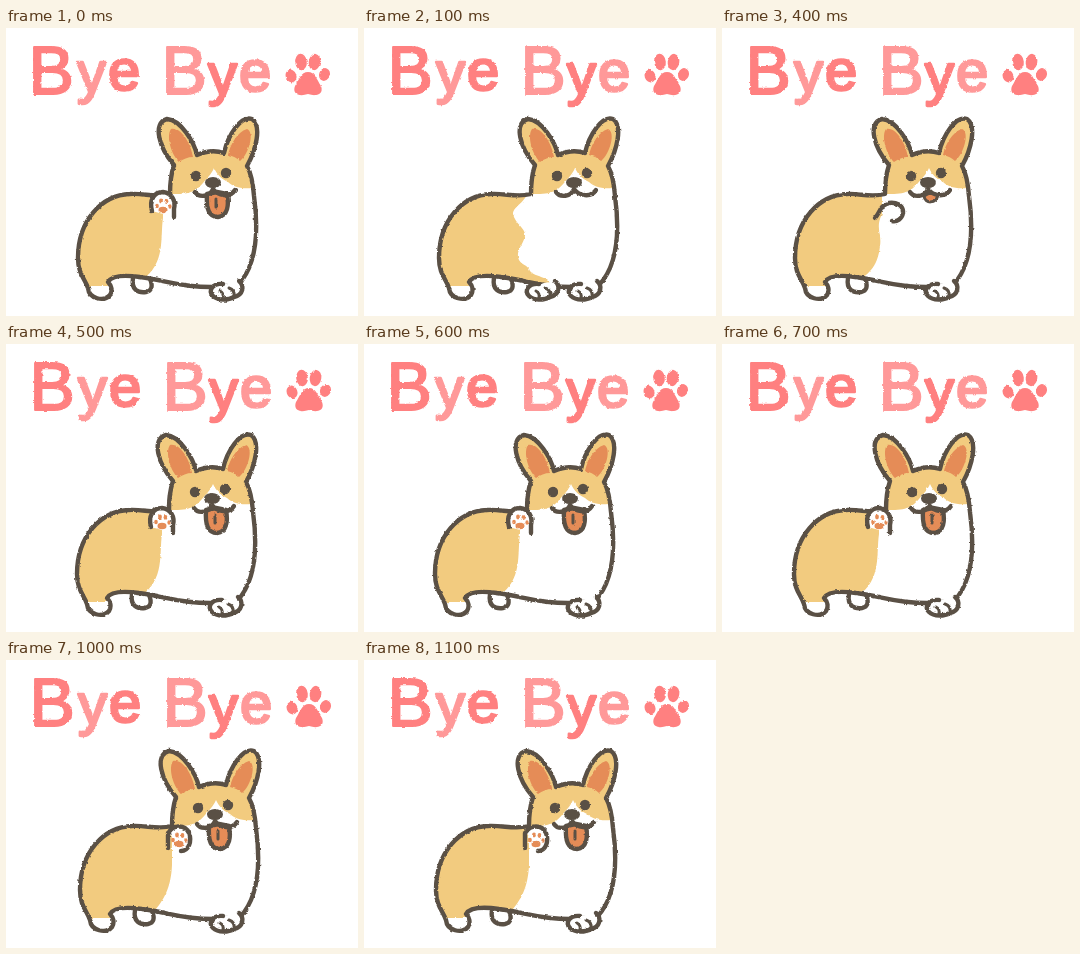
An HTML page for the animation above (1200 ms loop, 352 by 288 pixels).

```html
<!DOCTYPE html>
<html lang="en">
<head>
<meta charset="utf-8">
<title>Bye Bye</title>
<style>
html, body { margin: 0; width: 100%; height: 100%; overflow: hidden; background: #fff; }
svg { display: block; width: 352px; height: 288px; }
.line { fill: none; stroke: #5a5045; stroke-width: 4.4; stroke-linecap: round; stroke-linejoin: round; }
.white { fill: #fff; }
.tan { fill: #f2cb7f; }
.orange { fill: #e58c57; }
.dark { fill: #5a5045; }
.thin { stroke-width: 3; }
text { font: 58px "Liberation Sans", Arial, sans-serif; stroke-width: 2.6; stroke-linejoin: round; }
.cap { font-size: 68px; stroke-width: 2; }
.deep { fill: #ff8080; stroke: #ff8080; }
.pale { fill: #ff9999; stroke: #ff9999; }
.print { stroke: none; }
</style>
</head>
<body>
<svg viewBox="0 0 352 288">
  <defs>
    <filter id="crayon" filterUnits="userSpaceOnUse" x="0" y="0" width="352" height="288" color-interpolation-filters="sRGB">
      <feTurbulence id="noise" type="fractalNoise" baseFrequency=".3" numOctaves="2" result="n"/>
      <feDisplacementMap in="SourceGraphic" in2="n" scale="2.5" xChannelSelector="R" yChannelSelector="G"/>
    </filter>
    <clipPath id="inside"><path id="mask"/></clipPath>
  </defs>
  <g filter="url(#crayon)">
    <g id="title">
      <text><tspan class="deep cap" x="22.4" y="66">B</tspan><tspan class="pale" x="71" y="64">y</tspan><tspan class="deep" x="102" y="62">e</tspan>
        <tspan class="pale cap" x="155.4" y="66">B</tspan><tspan class="deep" x="202" y="66">y</tspan><tspan class="pale" x="233" y="63">e</tspan></text>
      <g class="deep print">
        <path d="M302 44C309 44 311 52 315 58C318 66 311 69 302 66C293 69 286 66 289 58C293 52 295 44 302 44Z"/>
        <ellipse cx="285" cy="48" rx="5.400" ry="6.500" transform="rotate(-20 285 48)"/>
        <ellipse cx="295" cy="34" rx="5.800" ry="8.200" transform="rotate(-6 295 34)"/>
        <ellipse cx="308.500" cy="34" rx="5.800" ry="8.200" transform="rotate(8 308.500 34)"/>
        <ellipse cx="318.500" cy="46.500" rx="5.400" ry="6.500" transform="rotate(20 318.500 46.500)"/>
      </g>
    </g>
    <g id="dog"></g>
  </g>
</svg>
<script>
const $ = id => document.getElementById(id);
const shape = (cls, d) => `<path class="${cls}" d="${d}"/>`;
const oval = (cls, x, y, rx, ry = rx) => `<ellipse class="${cls}" cx="${x}" cy="${y}" rx="${rx}" ry="${ry}"/>`;

// h shifts the rump sideways
const outline = h => `M164 166C150 170 138 165 ${124 + h} 166C${96 + h} 167 ${72 + h} 192 ${72 + h} 230
  C${72 + h} 246 ${79 + h} 251 ${82 + h} 260C${83 + h} 271 ${98 + h} 274 ${104 + h} 267
  C${107 + h} 262 ${105 + h} 257 ${102 + h} 254C${106 + h} 247 120 247 134 249C160 252 172 259 205 259
  L232 257C250 238 253 205 248 168C247 155 245 145 241 138C250 122 256 98 246 91
  C235 87 222 107 218 125C209 122 200 123 191 127C188 114 175 92 161 91
  C146 95 153 120 168 137C165 146 164 156 164 166Z`;

const coat = {
  stand: 'H163C158 176 146 178 146 186C148 196 159 200 158 208C156 217 150 221 151 229C153 238 161 236 163 243C169 250 180 247 183 257',
  step: 'H162C160 176 148 178 148 186C149 196 160 200 160 208C157 217 151 222 156 230C158 240 166 240 170 246L166 258',
  lift: 'H161V186C154 200 161 205 159 218C157 236 150 246 134 254',
  left: 'H157V190C154 210 160 235 136 252',
  right: 'H164V205C163 228 156 240 144 254'
};

const foot = dx => `<g transform="translate(${dx})">`
  + shape('line white', 'M217 256C206 255 202 263 207 268C212 273 223 272 228 269C237 267 239 258 233 253')
  + shape('line thin', 'M214 263Q218 265 217 270M223 260Q229 262 228 268') + '</g>';

const paw = (x, y, edge) => `<g transform="translate(${x} ${y})">` + shape('line white', edge)
  + oval('orange', 0, 5, 4.5, 3.3) + oval('orange', -6, 1, 1.8, 2.3) + oval('orange', -2, -4, 1.9, 2.4)
  + oval('orange', 3.5, -3.5, 1.9, 2.4) + oval('orange', 7, 1.5, 1.6, 2.2) + '</g>';

const limb = {
  stand: () => foot(-45) + foot(-3),
  step: () => foot(0) + shape('line white', 'M163 245C172 239 186 235 190 244C194 253 184 258 176 256C171 255 167 255 164 258'),
  lift: () => foot(0) + shape('line', 'M154 190C157 187 158 183 161 179C168 172 183 174 182 185C181 191 176 194 171 193'),
  left: () => foot(0) + paw(157, 177, 'M-11 6C-14 -5 -9 -13 0 -13C9 -12 13 -4 11 4L11 12'),
  right: () => foot(-2) + paw(171, 179, 'M-10 -7C-6 -14 6 -15 10 -6C13 2 10 12 2 12M-11 -6V9')
};

function face(pose) {
  const shut = pose === 'stand' || pose === 'step';
  let tongue = '';
  if (pose === 'lift') tongue = shape('line orange thin', 'M203 168C204 176 215 176 217 167Q210 163 203 168Z');
  else if (!shut) tongue = shape('line orange', 'M201 166C200 181 203 189 212 189C222 188 223 177 221 166L211 164Z')
    + shape('line thin', 'M210 171V179');
  return shape('orange', 'M165 101C160 108 165 126 173 134C177 131 182 129 187 129C185 117 176 99 165 101Z')
    + shape('orange', 'M241 101C231 104 224 117 222 127C227 128 231 130 234 133C243 126 249 104 241 101Z')
    + tongue
    + shape('line', 'M189 164C193 170 204 169 207 161C212 168 224 170 229 162')
    + oval('dark', 190, 148, 5.2) + oval('dark', 220, 145, 5.2) + oval('dark', 207, 154.5, 8, 5.5);
}

// pose, body shift, rump shift; one entry per 100 ms
const steps = [
  ['left', 0, 0], ['stand', 3, 0], ['stand', 2, 0], ['step', 1, -1], ['lift', -1, 2], ['left', -1, 0],
  ['left', -1, 0], ['left', 0, 0], ['right', 1, 0], ['right', 2, 0], ['right', 2, 0], ['right', 1, -1]
];
const headCoat = 'M150 80H262V157C240 163 228 160 222 154C214 150 211 146 208 140C205 147 201 150 197 155C192 161 186 167 166 166H150Z';

function draw(i) {
  const [pose, dx, h] = steps[i], body = outline(h);
  $('mask').setAttribute('d', body);
  $('noise').setAttribute('seed', 3 + i % 3);
  $('title').setAttribute('transform', `translate(${i % 3 ? 1 : 0})`);
  $('dog').setAttribute('transform', `translate(${dx})`);
  $('dog').innerHTML = shape('line white', 'M127 250C125 262 132 265 140 264C146 263 147 258 144 251')
    + shape('white', body)
    + `<g clip-path="url(#inside)">${shape('tan', 'M60 160' + coat[pose] + 'V258H60Z')}${shape('tan', headCoat)}</g>`
    + shape('line', body) + face(pose) + limb[pose]();
}

let shown = -1;
function tick() {
  const i = Math.floor(performance.now() / 100) % steps.length;
  if (i !== shown) draw(shown = i);
  requestAnimationFrame(tick);
}
tick();
</script>
</body>
</html>
```
